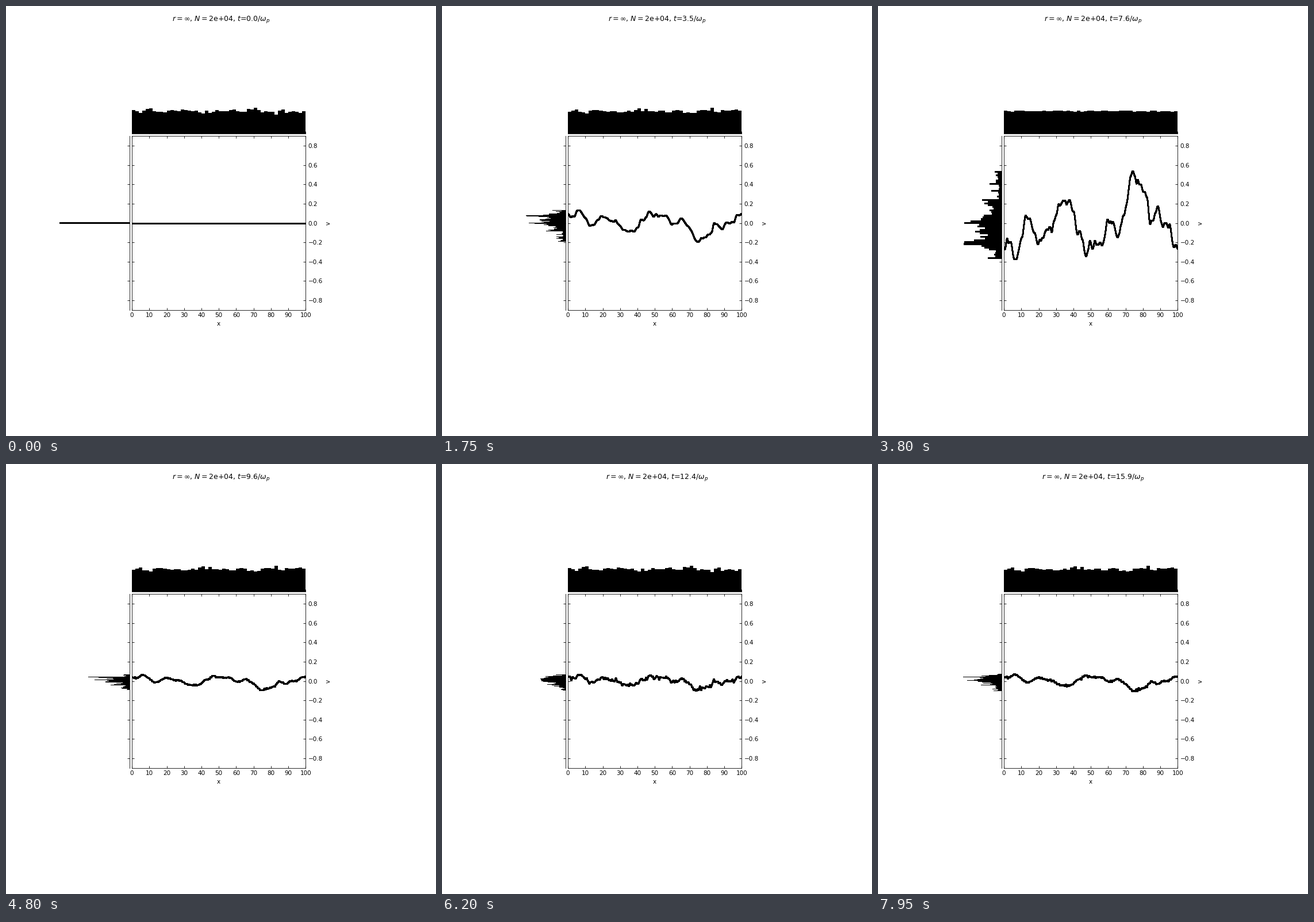
A matplotlib script for the animation above (8 s loop, 748 by 748 pixels).

```python
import numpy as np
import matplotlib.pyplot as plt
from matplotlib.animation import FuncAnimation

SIZE, DPI = 748, 74.8
N, L = 20000, 100.0
FRAMES = 160

# Main turning points of the velocity curve: (x, amplitude)
TURNS = [
    (0, -.28), (4, -.20), (5.5, -.39), (8.5, -.28), (12, .09), (15, .05), (22, -.14),
    (28, -.03), (31, .19), (34, .26), (36, .17), (38, .25), (42, -.12), (45, -.17),
    (47, -.36), (49, -.18), (53.5, -.23), (59.5, .04), (64.7, -.13), (70.5, .21),
    (72.5, .50), (74, .55), (82.5, .28), (83.7, -.01), (88.5, .20), (91.5, -.06),
    (95, 0), (97.5, -.26),
]

rest = (np.arange(N) + 0.5) * L / N
mode = np.arange(N // 2 + 1)
smooth = np.exp(-(mode / 100) ** 2)
omega = np.cos(np.minimum(mode / 200, np.pi / 2))  # fine ripples lag behind


def amplitude_modes():
    """Spectrum of the turning points joined by a smoothed random walk."""
    rng = np.random.default_rng(4)
    walk = np.cumsum(rng.normal(0, 0.05 * np.sqrt(L / N), N))
    walk -= walk[-1] * rest / L
    turn_x, turn_v = np.transpose(TURNS)
    offset = turn_v - np.interp(turn_x, rest, walk)
    curve = walk + np.interp(rest, turn_x, offset, period=L)
    return np.fft.rfft(curve) * smooth


def plasma(t):
    """Positions and velocities of sheets oscillating about their rest places."""
    shift = np.fft.irfft(modes * np.cos(omega * t), N)
    v = np.fft.irfft(modes * omega * np.sin(omega * t), N)
    return (rest - shift) % L, v


def add_axes(left, top, right, bottom, **limits):
    box = [left / SIZE, 1 - bottom / SIZE, (right - left) / SIZE, (bottom - top) / SIZE]
    ax = fig.add_axes(box, facecolor="none", **limits)
    ax.tick_params(direction="in", length=4, width=0.8, pad=4, labelsize=10,
                   top=True, right=True)
    return ax


def keep_spine(ax, side):
    for name, spine in ax.spines.items():
        spine.set_visible(name == side)
    ax.tick_params(labelbottom=False, labelleft=False,
                   **{s: s == side for s in ("left", "right", "top", "bottom")})


def px_text(x, y, text, **style):
    fig.text(x / SIZE, 1 - y / SIZE, text, fontsize=10, ha="center", va="baseline", **style)


modes = amplitude_modes()
fig = plt.figure(figsize=(SIZE / DPI, SIZE / DPI), dpi=DPI, facecolor="white")

X0, X1, Y0, Y1 = 219.1, 521.3, 226.4, 528.6
x_ticks = range(0, 101, 10)
v_ticks = np.arange(-4, 5) / 5
main = add_axes(X0, Y0, X1, Y1, xlim=(0, L), ylim=(-0.9, 0.9))
main.set_xticks(x_ticks)
main.set_yticks(v_ticks)
main.tick_params(labelleft=False, labelright=True)

x_hist = add_axes(X0, 99.8, X1, 222.3, xlim=(0, L), ylim=(0, 1240))
x_hist.set_xticks(x_ticks)
keep_spine(x_hist, "bottom")

v_hist = add_axes(93, Y0, 215.2, Y1, xlim=(2000, 0), ylim=(-0.9, 0.9))
v_hist.set_yticks(v_ticks)
keep_spine(v_hist, "right")

px_text(370.2, 556, "x")
px_text(564, 377.5, "v", rotation=90, rotation_mode="anchor")
title = fig.suptitle("", fontsize=12)

dots, = main.plot([], [], "k.", markersize=2, markeredgewidth=1)
x_bars = x_hist.stairs([0], [0, L], fill=True, color="black", linewidth=0)
v_bars = v_hist.stairs([0], [-0.9, 0.9], fill=True, color="black", linewidth=0,
                       orientation="horizontal")


def draw(i):
    x, v = plasma(i / 10)
    dots.set_data(x, v)
    x_bars.set_data(*np.histogram(x, bins=50, range=(0, L)))
    if np.ptp(v) > 0:
        v_bars.set_data(*np.histogram(v, bins=50))
    else:
        v_bars.set_data([N], [-0.009, 0.009])
    title.set_text(rf"$r=\infty$, $N=$2e+04, $t$={i / 10:.1f}/$\omega_p$")
    return dots, x_bars, v_bars, title


anim = FuncAnimation(fig, draw, frames=FRAMES, interval=50, repeat=True, repeat_delay=0)
plt.show()
```
